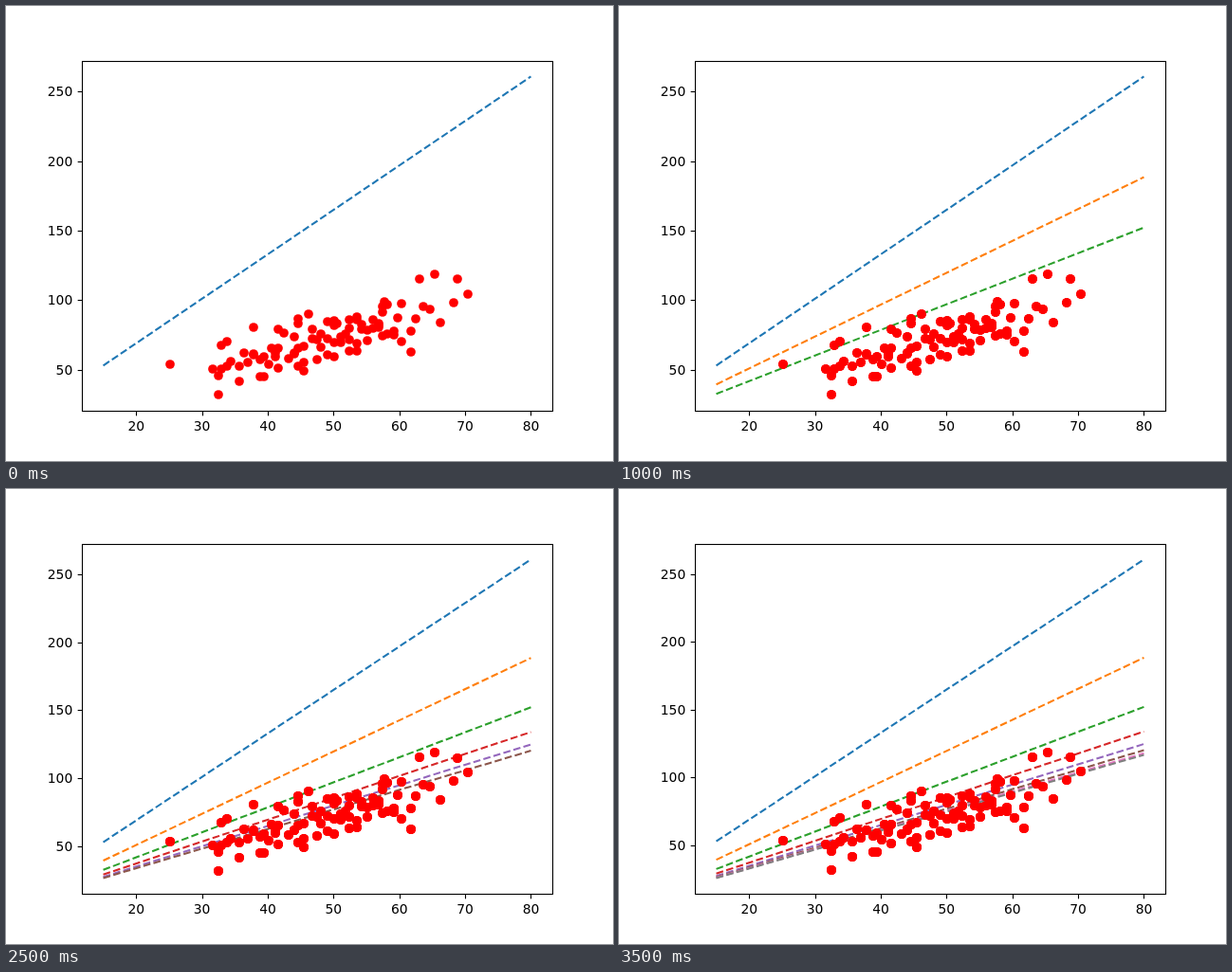
Animation, 640 px wide and 480 px high, one loop 4 s. Source, as an HTML page with a canvas:

```html
<!DOCTYPE html>
<html lang="en">
<head>
<meta charset="utf-8">
<title>Gradient descent line fit</title>
<style>
  html, body { margin: 0; width: 100%; height: 100%; overflow: hidden; background: #fff; }
  canvas { display: block; }
</style>
</head>
<body>
<canvas id="stage" width="640" height="480"></canvas>
<script>
const ctx = document.getElementById('stage').getContext('2d');

const STEP_MS = 500, STEPS = 8;
const COLORS = ['#1f77b4', '#ff7f0e', '#2ca02c', '#d62728',
                '#9467bd', '#8c564b', '#e377c2', '#7f7f7f'];
const BOX = { left: 80, right: 576, top: 57.6, bottom: 427.2 };
const X_MIN = 15, X_MAX = 80, MARGIN = 1 / 22;
const PT = 100 / 72;

// Each column: x, followed by the y values found there.
const columns = [
  [25.13, 53.5], [31.59, 50.4], [32.58, 31.7, 45.6], [33, 67.2, 50.7],
  [33.75, 69.9, 52.7], [34.33, 55.7], [35.62, 41.4, 52.7], [36.44, 62.1],
  [36.93, 55.2], [37.9, 60.8, 61.4, 80.2], [38.88, 56.9, 44.8],
  [39.43, 59.2, 44.9], [40.17, 54.1], [40.6, 65.6], [41.14, 59.4, 61.7],
  [41.56, 79.1, 51.4, 65.3], [42.44, 76.6], [43.21, 58.2],
  [44.06, 61.4, 62, 73.7], [44.56, 86.6, 65.1, 52.7, 82.9],
  [45.5, 55.2, 66.6, 48.8], [46.23, 90.1], [46.71, 72.2, 79.1],
  [47.48, 71.5, 57.3], [48.13, 75.3, 66.2], [49.13, 60.7, 84.7, 72.1],
  [50.1, 81.5, 85.2, 59.1, 69.7], [50.56, 83.4], [51.09, 73.4, 69.6],
  [51.85, 75.4], [52.34, 79.6, 63.4, 86.1, 71.3],
  [53.57, 68.8, 88, 63.6, 85.7], [54.32, 79.1, 82.5], [55.11, 71.1, 78.2],
  [55.97, 79.6, 85.5], [56.83, 81.4, 83.1, 80.2], [57.42, 95.5, 91.5, 74.1],
  [57.79, 99.1], [58.17, 96.8, 75.4], [59.21, 77.6, 74.8], [59.81, 87.2],
  [60.28, 70.3, 97.4], [61.72, 62.6, 77.8], [62.49, 86.5], [63, 115.2],
  [63.62, 95.2], [64.71, 93.6], [65.42, 118.6], [66.19, 83.9],
  [68.32, 97.9], [68.77, 114.9], [70.35, 104.3]
];
const points = columns.flatMap(([x, ...ys]) => ys.map(y => [x, y]));
const lowestPoint = Math.min(...points.map(p => p[1]));

// Gradient descent on the mean squared error, from the data's moments.
function descend(count) {
  const meanX = 48.958, meanY = 72.735, meanXX = 2490.9, meanXY = 3685.2;
  const rate = 0.0001;
  const fits = [];
  let slope = 5, offset = 5;
  for (let i = 0; i < count; i++) {
    const slopeGrad = 2 * (slope * meanXX + offset * meanX - meanXY);
    const offsetGrad = 2 * (slope * meanX + offset - meanY);
    slope -= rate * slopeGrad;
    offset -= rate * offsetGrad;
    fits.push({ start: slope * X_MIN + offset, end: slope * X_MAX + offset });
  }
  return fits;
}
const fits = descend(STEPS);

// Maps a data range onto a pixel range, leaving a margin at both ends.
function scale(lo, hi, from, to) {
  const pad = (to - from) * MARGIN;
  return v => from + pad + (v - lo) / (hi - lo) * (to - from - 2 * pad);
}
const px = scale(X_MIN, X_MAX, BOX.left, BOX.right);

function strokeLine(x1, y1, x2, y2) {
  ctx.beginPath();
  ctx.moveTo(x1, y1);
  ctx.lineTo(x2, y2);
  ctx.stroke();
}

function drawFit(fit, color, py) {
  ctx.strokeStyle = color;
  ctx.lineWidth = 1.5 * PT;
  ctx.setLineDash([5.55 * PT, 2.4 * PT]);
  strokeLine(px(X_MIN), py(fit.start), px(X_MAX), py(fit.end));
  ctx.setLineDash([]);
}

function drawPoints(py) {
  ctx.fillStyle = '#f00';
  for (const [x, y] of points) {
    ctx.beginPath();
    ctx.arc(Math.round(px(x)), Math.round(py(y)), 3.5 * PT, 0, 2 * Math.PI);
    ctx.fill();
  }
}

function drawAxes(py) {
  const tick = 3.5 * PT;
  ctx.strokeStyle = ctx.fillStyle = '#000';
  ctx.lineWidth = 0.8 * PT;
  ctx.font = `${10 * PT}px "DejaVu Sans", sans-serif`;
  ctx.strokeRect(80.5, 58.5, 496, 369);

  ctx.textAlign = 'center';
  for (let v = 20; v <= 80; v += 10) {
    const x = Math.round(px(v)) + 0.5;
    strokeLine(x, 428, x, 427.5 + tick);
    ctx.fillText(v, px(v), 448);
  }
  ctx.textAlign = 'right';
  for (let v = 50; v <= 250; v += 50) {
    const y = Math.round(py(v)) + 0.5;
    strokeLine(80, y, 80.5 - tick, y);
    ctx.fillText(v, BOX.left - 2 * tick, Math.round(py(v) + 5));
  }
}

function draw(step) {
  const shown = fits.slice(0, step + 1);
  const lowest = Math.min(lowestPoint, ...shown.map(f => f.start));
  const py = scale(lowest, fits[0].end, BOX.bottom, BOX.top);

  ctx.fillStyle = '#fff';
  ctx.fillRect(0, 0, 640, 480);
  // The points are laid down again with each new line, which hardens their edges.
  shown.forEach((fit, i) => {
    drawFit(fit, COLORS[i], py);
    drawPoints(py);
  });
  drawAxes(py);
}

const startTime = performance.now();
let current = -1;
function tickFrame() {
  const step = Math.floor((performance.now() - startTime) / STEP_MS) % STEPS;
  if (step !== current) draw(current = step);
  requestAnimationFrame(tickFrame);
}
tickFrame();
</script>
</body>
</html>
```
